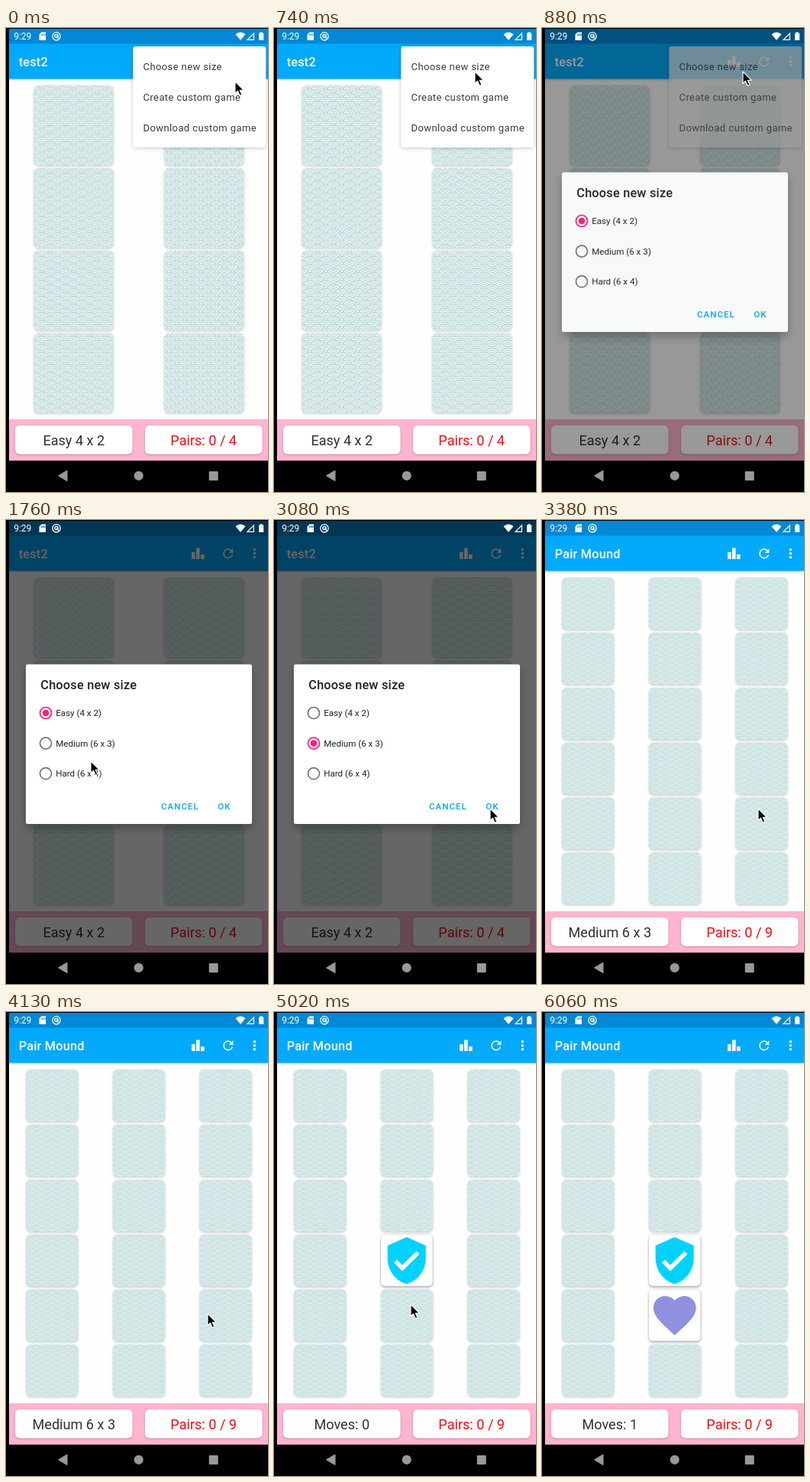
An HTML page that plays this animation: 343x606 px, repeating every 6510 ms.

```html
<!DOCTYPE html>
<html lang="en">
<head>
<meta charset="utf-8">
<title>Memory card game</title>
<style>
  html, body { margin: 0; width: 100%; height: 100%; overflow: hidden; background: #000; }
  svg { display: block; width: 343px; height: 606px; }
  text { font-family: Roboto, sans-serif; white-space: pre; }
  .title { font-size: 16.3px; font-weight: 500; letter-spacing: .0125em; }
  .item { font-size: 13px; letter-spacing: .03em; fill: #3a3a3a; }
  .label { font-size: 11.6px; fill: #212121; }
  .action { font-size: 11.5px; font-weight: 500; letter-spacing: .09em; fill: #03a9f4; }
  .info { font-size: 18.1px; text-anchor: middle; }
  .raised { filter: drop-shadow(0 1px 1.8px rgba(0, 0, 0, .22)); }
  .popup { filter: drop-shadow(0 1px 2.5px rgba(0, 0, 0, .22)); }
  .modal { filter: drop-shadow(0 6px 6px rgba(0, 0, 0, .28)); }
</style>
</head>
<body>
<svg viewBox="0 0 343 606">
  <defs>
    <g id="fan" stroke="#90c0c1" stroke-width=".85" fill="#f8fbfb">
      <circle r="10"/><circle r="7.6"/><circle r="5.2"/><circle r="2.8"/>
    </g>
    <pattern id="waves" width="20" height="10" patternUnits="userSpaceOnUse"></pattern>
    <pattern id="easyWaves" href="#waves" patternTransform="translate(36.5 75) scale(1.04)"/>
    <pattern id="mediumWaves" href="#waves" patternTransform="translate(26.3 75) scale(.68)"/>
  </defs>

  <rect x="4" y="1" width="339" height="564" fill="#fefefe"/>
  <g id="easy"></g>
  <g id="medium"></g>
  <g id="shield">
    <rect class="raised" x="140" y="290.8" width="67.5" height="67" rx="5" fill="#fff"/>
    <path transform="translate(140.3 291.2) scale(2.78)" fill="#00d2ff" d="M12 1L3 5v6c0 5.55 3.84 10.74 9 12 5.16-1.26 9-6.45 9-12V5l-9-4zm-2 16l-4-4 1.41-1.41L10 14.17l6.59-6.59L18 9l-8 8z"/>
  </g>
  <g id="heart">
    <rect class="raised" x="140" y="362.6" width="67.5" height="67" rx="5" fill="#fff"/>
    <path transform="translate(140.3 362.6) scale(2.79)" fill="#8f90e0" d="M12 21.35l-1.45-1.32C5.4 15.36 2 12.28 2 8.5 2 5.42 4.42 3 7.5 3c1.74 0 3.41.81 4.5 2.09C13.09 3.81 14.76 3 16.5 3 19.58 3 22 5.42 22 8.5c0 3.78-3.4 6.86-8.55 11.54L12 21.35z"/>
  </g>

  <!-- Toolbar -->
  <rect class="raised" x="4" y="20" width="339" height="46.5" fill="#03a9fb"/>
  <rect x="4" y="1" width="339" height="19.5" fill="#0288d6"/>
  <g fill="#fff">
    <text id="title" class="title" x="16.7" y="50"></text>
    <path d="M243 42h4.6v9H243zM249 36.5h4.6V51H249zM255 45h4.6v6H255z"/>
    <path transform="translate(281 34) scale(.82)" d="M17.65 6.35A7.96 7.96 0 0 0 12 4a8 8 0 1 0 7.73 10h-2.08A6 6 0 1 1 12 6c1.66 0 3.14.69 4.22 1.78L13 11h7V4z"/>
    <circle cx="325.3" cy="38.8" r="1.7"/><circle cx="325.3" cy="43.8" r="1.7"/><circle cx="325.3" cy="48.8" r="1.7"/>
  </g>

  <!-- Score bar -->
  <rect x="4" y="511" width="339" height="54" fill="#ffb4d0"/>
  <g class="raised" fill="#fff">
    <rect x="12" y="519" width="153.5" height="37.5" rx="6"/>
    <rect x="182" y="519" width="153.5" height="37.5" rx="6"/>
  </g>
  <text id="moves" class="info" x="88.8" y="545" fill="#303030"></text>
  <text id="pairs" class="info" x="258.7" y="545" fill="#f20c0c"></text>

  <g id="menu">
    <rect class="popup" x="166.3" y="24" width="174" height="132" rx="3" fill="#fff"/>
    <text class="item" x="179.6" y="55.2">Choose new size</text>
    <text class="item" x="179.6" y="95">Create custom game</text>
    <text class="item" x="179.6" y="134.8">Download custom game</text>
  </g>

  <rect id="dim" x="4" y="1" width="339" height="564"/>
  <g id="dialog">
    <rect class="modal" x="26" y="188.5" width="296" height="208.5" rx="2.5" fill="#fff"/>
    <text class="title" x="45.3" y="220.5" fill="#212121">Choose new size</text>
    <circle id="ripple" cx="52" cy="291.5" r="15" fill="#ff1f7a"/>
    <g id="radios"></g>
    <text class="action" x="203" y="378">CANCEL</text>
    <text class="action" x="277.3" y="378">OK</text>
  </g>

  <!-- System bars -->
  <g fill="#fff">
    <text x="10.2" y="15" font-size="12">9:29</text>
    <path d="M46.5 5.5H52v10.5h-8.5V8.5zM46.4 7.5v2.4h1V7.5zm2 0v2.4h1V7.5zm2 0v2.4h1V7.5z" fill-rule="evenodd"/>
    <g fill="none" stroke="#fff" stroke-width="1.3">
      <circle cx="66" cy="10.8" r="5.2"/><circle cx="66" cy="10.5" r="2.2"/><path d="M66 10.5l3.6 3.6"/>
    </g>
    <path d="M300.5 8.2q6.5-5.2 13 0L307 16z"/>
    <path d="M325 5.5V16h-10.5zM323.8 8.4l-6.4 6.4h6.4z" fill-rule="evenodd"/>
    <path d="M331 6.5h1.8V5.2h2.6v1.3h1.8V16H331z"/>
  </g>
  <g fill="#999">
    <path d="M68.5 584.8L80 578v13.6z" stroke="#999" stroke-linejoin="round"/>
    <circle cx="173.7" cy="584.8" r="6.1"/>
    <rect x="265.7" y="579" width="12" height="12" rx="1"/>
  </g>

  <path id="cursor" d="M0 0v15.5l3.5-3.3 2.6 6 2.7-1.2-2.6-5.8h4.9z" fill="#000" stroke="#fff" stroke-width="1.1" stroke-linejoin="round"/>
</svg>
<script>
const LOOP = 6510;
const $ = id => document.getElementById(id);
const show = (id, alpha) => $(id).setAttribute('opacity', +alpha);
const write = (id, text) => { if ($(id).textContent !== text) $(id).textContent = text; };

// Overlapping fans, each row covering the one above.
let fans = '';
for (let row = -1; row <= 4; row++)
  for (const x of row % 2 ? [10] : [0, 20]) fans += `<use href="#fan" x="${x}" y="${row * 5}"/>`;
$('waves').innerHTML = fans;

function deal(id, xs, rows, size, step) {
  let cards = '';
  for (let r = 0; r < rows; r++)
    for (const x of xs)
      cards += `<rect class="raised" x="${x}" y="${75.3 + r * step}" width="${size}" height="${size}" rx="6" fill="url(#${id}Waves)"/>`;
  $(id).innerHTML = cards;
}
deal('easy', [36.5, 207.2], 4, 104.3, 107.7);
deal('medium', [26.3, 140, 253.5], 6, 68, 71.8);

$('radios').innerHTML = ['Easy (4 x 2)', 'Medium (6 x 3)', 'Hard (6 x 4)'].map((name, i) => {
  const y = 252 + i * 39.6;
  return `<circle class="ring" cx="52" cy="${y}" r="7.5" fill="none" stroke-width="1.7"/>
    <circle class="dot" cx="52" cy="${y}" r="4.3" fill="#ff1f7a"/>
    <text class="label" x="65.2" y="${y + 4.2}">${name}</text>`;
}).join('');
const rings = document.querySelectorAll('.ring'), dots = document.querySelectorAll('.dot');

// Pointer stops: time, x, y
const path = [
  [0, 300, 70], [150, 298, 69], [300, 290, 65], [440, 278, 61], [590, 267, 58], [730, 263, 57],
  [1020, 240, 135], [1170, 208, 246], [1320, 180, 288], [1470, 152, 311], [1610, 130, 319],
  [1760, 111, 315], [1900, 88, 303], [2050, 68, 294], [2190, 57, 289],
  [2490, 74, 295], [2640, 130, 322], [2790, 205, 357], [2930, 266, 375], [3080, 283, 377],
  [4130, 264, 394], [4280, 230, 370], [4430, 198, 343], [4570, 180, 328], [4720, 176, 325],
  [4870, 177, 348], [5020, 179, 382], [5170, 180, 396],
  [5620, 190, 430], [5770, 217, 505], [5910, 253, 588], [6060, 260, 640]
];

function draw(t) {
  const [, x, y] = path.findLast(p => p[0] <= t);
  $('cursor').setAttribute('transform', `translate(${x} ${y})`);

  const opening = t >= 880 && t < 1020, open = t >= 1020 && t < 3230, closing = t >= 3230 && t < 3380;
  show('menu', t < 880 ? 1 : opening ? .72 : 0);
  show('dim', opening ? .4 : open ? .6 : closing ? .34 : 0);
  show('dialog', opening ? .94 : open ? 1 : closing ? .25 : 0);

  const picked = t < 2190 ? 0 : 1;
  rings.forEach((ring, i) => ring.setAttribute('stroke', i === picked ? '#ff1f7a' : '#757575'));
  dots.forEach((dot, i) => dot.setAttribute('opacity', +(i === picked)));
  show('ripple', t >= 2190 && t < 2340 ? .14 : 0);

  const dealt = t >= 3230, first = t >= 4720, second = t >= 5170;
  show('easy', !dealt);
  show('medium', dealt);
  show('shield', first);
  show('heart', second);
  write('title', dealt ? 'Pair Mound' : 'test2');
  write('moves', second ? 'Moves: 1' : first ? 'Moves: 0' : dealt ? 'Medium 6 x 3' : 'Easy 4 x 2');
  write('pairs', dealt ? 'Pairs: 0 / 9' : 'Pairs: 0 / 4');
}

const start = performance.now();
function tick() {
  draw((performance.now() - start) % LOOP);
  requestAnimationFrame(tick);
}
tick();
</script>
</body>
</html>
```
